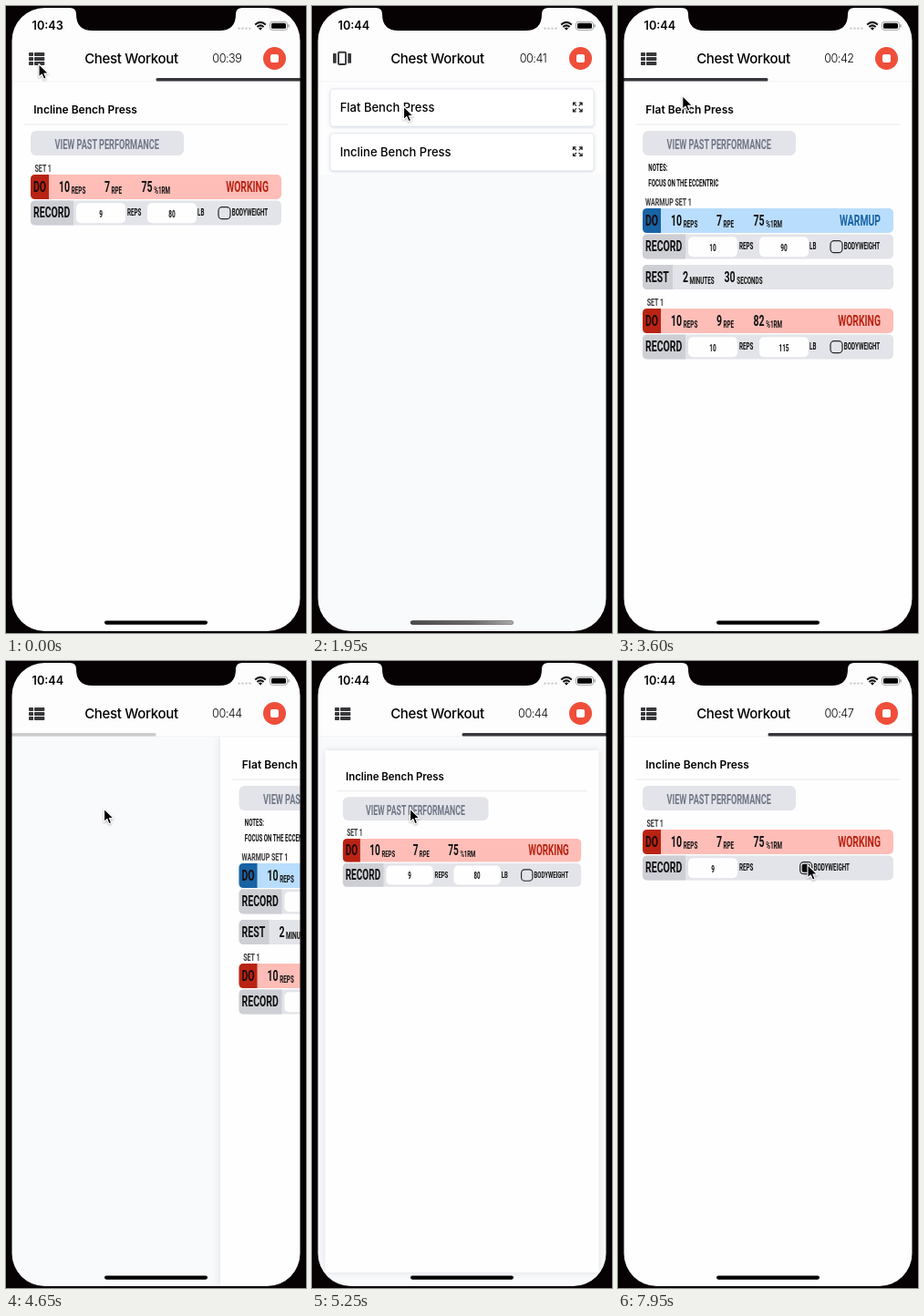
An HTML page that plays this animation: 329x688 px, repeating every 8 s.

```html
<!DOCTYPE html>
<html lang="en">
<head>
<meta charset="utf-8">
<title>Chest Workout</title>
<style>
html, body { margin: 0; width: 100%; height: 100%; overflow: hidden; background: #060203; }
svg { display: block; width: 100%; height: 100%; font-family: Inter, "Liberation Sans", sans-serif; }
.caps { font-family: Roboto, "Liberation Sans", sans-serif; font-weight: 700; }
.sheet { fill: #fefefe; filter: drop-shadow(0 0 4px rgba(20, 25, 50, .13)); }
.card { fill: #fff; stroke: #e6e9f0; filter: drop-shadow(0 1px 1.5px rgba(70, 90, 130, .2)); }
.title { font-size: 12px; font-weight: 600; }
.item { font-size: 13px; font-weight: 500; }
</style>
</head>
<body>
<svg id="stage" viewBox="0 0 329 688"></svg>
<script>
const LOOP = 8000, STEP = 150;
const GREY = '#e3e4e9', GREY_DARK = '#cecfd5';
const RED = ['#b92313', '#febdb7'], BLUE = ['#1763a4', '#b9ddfc'];

const rect = (x, y, w, h, r, fill, extra = '') =>
  `<rect x="${x}" y="${y}" width="${w}" height="${h}" rx="${r}" fill="${fill}" ${extra}/>`;

// Condensed capitals
const caps = (x, y, size, text, fill = '#111', anchor = 'start') =>
  `<text class="caps" transform="translate(${x} ${y}) scale(.61 1)" font-size="${size}" fill="${fill}" text-anchor="${anchor}">${text}</text>`;

const bar = (y, blockW, dark, light) =>
  rect(27, y, 275, 27, 5, light) +
  `<path d="M${27 + blockW} ${y}H32q-5 0 -5 5v17q0 5 5 5H${27 + blockW}z" fill="${dark}"/>`;

const amount = (x, y, n, unit) =>
  caps(x, y + 18.7, 17.3, n) + caps(x + 1 + 6.4 * n.length, y + 21, 10.3, unit);

const doRow = (y, [dark, light], reps, rpe, load, kind) =>
  bar(y, 20, dark, light) + caps(30, y + 19, 17.3, 'DO', '#1d0b0c') +
  amount(58, y, reps, 'REPS') + amount(108, y, rpe, 'RPE') + amount(148.5, y, load, '%1RM') +
  caps(288, y + 18.7, 17, kind, dark, 'end');

const input = (x, y, n) =>
  rect(x, y + 2.7, 54, 22, 5, '#fefefe') + caps(x + 27, y + 18, 10.6, n, '#111', 'middle');

const recordRow = (y, reps, load, id = '') =>
  bar(y, 47, GREY_DARK, GREY) + caps(30, y + 18.8, 17.3, 'RECORD') +
  input(77, y, reps) + caps(133, y + 16.6, 10.3, 'REPS') +
  `<g id="${id}load">${input(155, y, load)}${caps(210, y + 16.6, 10.3, 'LB')}</g>` +
  `<g id="${id}weight">${rect(233, y + 7.2, 13, 13, 4, 'none', 'stroke="#26262a" stroke-width="1.2"')}` +
  `<g id="${id}tick" visibility="hidden">${rect(235, y + 9.2, 9, 9, 2, '#0c0c0e')}</g>` +
  caps(247.7, y + 16.6, 10.3, 'BODYWEIGHT') + '</g>';

const restRow = y =>
  bar(y, 33, GREY_DARK, GREY) + caps(30, y + 19, 17.3, 'REST') +
  amount(71, y, '2', 'MINUTES') + amount(116.5, y, '30', 'SECONDS');

const page = (id, title, body) =>
  `<g id="${id}"><rect class="sheet" x="6.5" y="83" width="316" height="603"/>
  <text class="title" x="30.3" y="118">${title}</text>
  ${rect(20, 129.3, 289, 1.2, 0, '#eceef1')}${rect(27, 137, 168, 27, 6, GREY)}
  ${caps(110.7, 157.4, 15, 'VIEW PAST PERFORMANCE', '#707786', 'middle')}${body}</g>`;

const arm = a => `<path transform="rotate(${a})" d="M1.3-1.3L4.6-4.6M1.7-4.8H4.8V-1.7"/>`;
const listItem = (y, title, id) =>
  `<rect class="card" x="20" y="${y}" width="289" height="41" rx="3"/>
  <text class="item" id="${id}" x="30.7" y="${y + 25}">${title}</text>
  <g transform="translate(291.3 ${y + 20})" fill="none" stroke="#222" stroke-width="1.2">${[0, 90, 180, 270].map(arm).join('')}</g>`;

const listRow = y => rect(25, y, 5, 4, .7, '#38383b') + rect(31, y, 11.3, 4, .7, '#38383b');

const header = `
  ${rect(6, 2, 317, 81, 0, '#fdfdfe')}${rect(6, 82.4, 317, .9, 0, '#eff0f3')}
  <text id="clock" x="28.6" y="26" font-size="12.6" font-weight="600"></text>
  <g fill="#c9c9cc">${[255.5, 259.5, 263.5, 267.5].map(x => `<circle cx="${x}" cy="24.6" r="1.2"/>`).join('')}</g>
  <g fill="none" stroke="#111" stroke-width="2"><path d="M273.2 20.5q5.8-5.2 11.6 0M275.4 23q3.6-3.2 7.2 0"/></g>
  <path d="M276.9 24.3q2.1-1.6 4.2 0L279 26.7z" fill="#111"/>
  ${rect(289.5, 17.3, 19, 9, 2.6, 'none', 'stroke="#999" stroke-width=".9"')}
  ${rect(291, 18.8, 16, 6, 1.5, '#000')}${rect(309.3, 20, 1.4, 3.6, .7, '#999')}
  <g id="listIcon">${[51, 56, 61].map(listRow).join('')}</g>
  <g id="deckIcon">${rect(29, 50.8, 8, 13.2, 1, 'none', 'stroke="#38383b" stroke-width="1.9"')}
  ${rect(23, 52, 3.7, 10.8, .6, '#38383b')}${rect(39.3, 52, 3.7, 10.8, .6, '#38383b')}</g>
  <text x="137.5" y="63" font-size="15" font-weight="500" letter-spacing="-.3" text-anchor="middle">Chest Workout</text>
  <text id="timer" x="242.4" y="62" font-size="12.6" font-weight="300" letter-spacing="-.45" text-anchor="middle"></text>
  <circle cx="294.5" cy="57.5" r="12.5" fill="#ef4e3a"/>${rect(290, 53, 9, 9, 2, '#fff')}
  <g id="tabL">${rect(5, 79, 159.5, 3.5, 1.5, '#37373b')}</g>
  <g id="tabR">${rect(164.5, 79, 160, 3.5, 1.5, '#37373b')}</g>`;

const bezel = `<path fill="#060203" fill-rule="evenodd" d="M0 0H329V688H0z
  M42.5 2H70q7 0 7 7q0 18 18 18H234q18 0 18-18q0-7 7-7H286.5a36 36 0 0 1 36 36V650a36 36 0 0 1-36 36H42.5a36 36 0 0 1-36-36V38a36 36 0 0 1 36-36z"/>`;

document.getElementById('stage').innerHTML = `
  <defs><linearGradient id="fade"><stop stop-color="#4a4a4a"/><stop offset=".6" stop-color="#6b6b6b"/><stop offset="1" stop-color="#aaa"/></linearGradient></defs>
  ${rect(0, 0, 329, 688, 0, '#f9fafc')}
  ${page('incline', 'Incline Bench Press',
    caps(31.5, 181.5, 11.6, 'SET 1', '#38383b') +
    doRow(185, RED, '10', '7', '75', 'WORKING') + recordRow(213.5, '9', '80', 'my'))}
  ${page('flat', 'Flat Bench Press',
    caps(33.3, 180.8, 10.1, 'NOTES:') + caps(33.3, 197.6, 10.1, 'FOCUS ON THE ECCENTRIC') +
    caps(30, 218.5, 11.6, 'WARMUP SET 1', '#38383b') +
    doRow(222, BLUE, '10', '7', '75', 'WARMUP') + recordRow(250.5, '10', '90', 'a') + restRow(284) +
    caps(31.7, 328.5, 11.6, 'SET 1', '#38383b') +
    doRow(332, RED, '10', '9', '82', 'WORKING') + recordRow(360.5, '10', '115', 'b'))}
  <g id="list">${rect(6, 83, 317, 603, 0, '#f9fafc')}${rect(6, 83, 317, 102, 0, '#fdfdfe')}
  ${listItem(91, 'Flat Bench Press', 'pick')}${listItem(139.7, 'Incline Bench Press', 'other')}</g>
  ${header}
  ${rect(108, 674.5, 113, 4.2, 2.1, '#000')}
  <g id="homeFade">${rect(108, 674.5, 113, 4.2, 2.1, 'url(#fade)')}</g>
  ${bezel}
  <path id="cursor" d="M0 0V14.6L3.3 11.5L5.5 16.7L8.1 15.6L5.9 10.6H10.6Z" fill="#000" stroke="#fff" stroke-width="1.1" stroke-linejoin="round" style="filter:drop-shadow(0 1px 1px rgba(0,0,0,.3))"/>`;

// Tracks: [ms, value, ...] with straight runs between the points
const tracks = {
  list: [[600, 0], [750, .4], [900, .8], [1050, 1], [2400, 1], [2550, 0]],
  tabL: [[2400, 0], [2550, .4], [2700, 1], [4200, 1], [4500, .5], [4650, .25], [4800, 0]],
  tabR: [[600, 1], [1050, 0], [4650, 0], [4800, .4], [5100, 1]],
  incline: [[600, 1], [1050, 0], [4650, 0], [4950, 1]],
  pick: [[1950, 1], [2100, .4], [2250, 1]],
  listIcon: [[0, 1], [300, .4], [450, 1]],
  slide: [[2400, 340], [2550, 316], [2700, 90], [2850, 10], [3000, 3], [3150, 0],
    [4200, 0], [4350, 14], [4500, 92], [4650, 228.5], [4800, 340]],
  zoom: [[1500, 1], [4650, .3], [4800, .6], [4950, .78], [5100, .89], [5250, .95], [5400, .977], [5550, .992], [5700, 1]],
  cursor: [[900, 36, 63.5], [1650, 100, 152], [1950, 100.5, 110], [2400, 100.5, 110], [2850, 58.5, 77.5],
    [3450, 58.5, 77.5], [4050, 107.5, 162], [5850, 107.5, 162], [6300, 198.5, 225.5], [6900, 238, 226],
    [7350, 238, 226], [7950, 208, 223.5]]
};

function at(name, t) {
  const pts = tracks[name], i = pts.findIndex(p => p[0] > t);
  if (i < 0) return pts[pts.length - 1].slice(1);
  if (i === 0) return pts[0].slice(1);
  const a = pts[i - 1], b = pts[i], k = (t - a[0]) / (b[0] - a[0]);
  return a.slice(1).map((v, j) => v + (b[j + 1] - v) * k);
}

const el = id => document.getElementById(id);
const show = (id, on) => el(id).setAttribute('visibility', on ? 'visible' : 'hidden');
const move = (id, value) => el(id).setAttribute('transform', value);

function draw(t) {
  for (const id of ['list', 'tabL', 'tabR', 'incline', 'pick', 'listIcon'])
    el(id).setAttribute('opacity', at(id, t)[0]);
  el('homeFade').setAttribute('opacity', at('list', t)[0]);

  const deck = t < 750 || t >= 2550;
  show('listIcon', deck);
  show('deckIcon', !deck);

  move('flat', `translate(${at('slide', t)[0]} 0)`);
  move('incline', `translate(164.5 384.5) scale(${at('zoom', t)[0]}) translate(-164.5 -384.5)`);
  move('cursor', `translate(${at('cursor', t).join(' ')})`);

  const checked = t >= 7200;
  show('myload', !checked);
  show('mytick', checked);
  move('myweight', `translate(${checked ? -33.3 : 0} 0)`);

  el('clock').textContent = t < 900 ? '10:43' : '10:44';
  el('timer').textContent = '00:' + (39 + Math.floor((t + 360) / 1000));
}

function tick() {
  const t = performance.now() % LOOP;
  draw(Math.floor(t / STEP) * STEP);
  requestAnimationFrame(tick);
}
tick();
</script>
</body>
</html>
```
